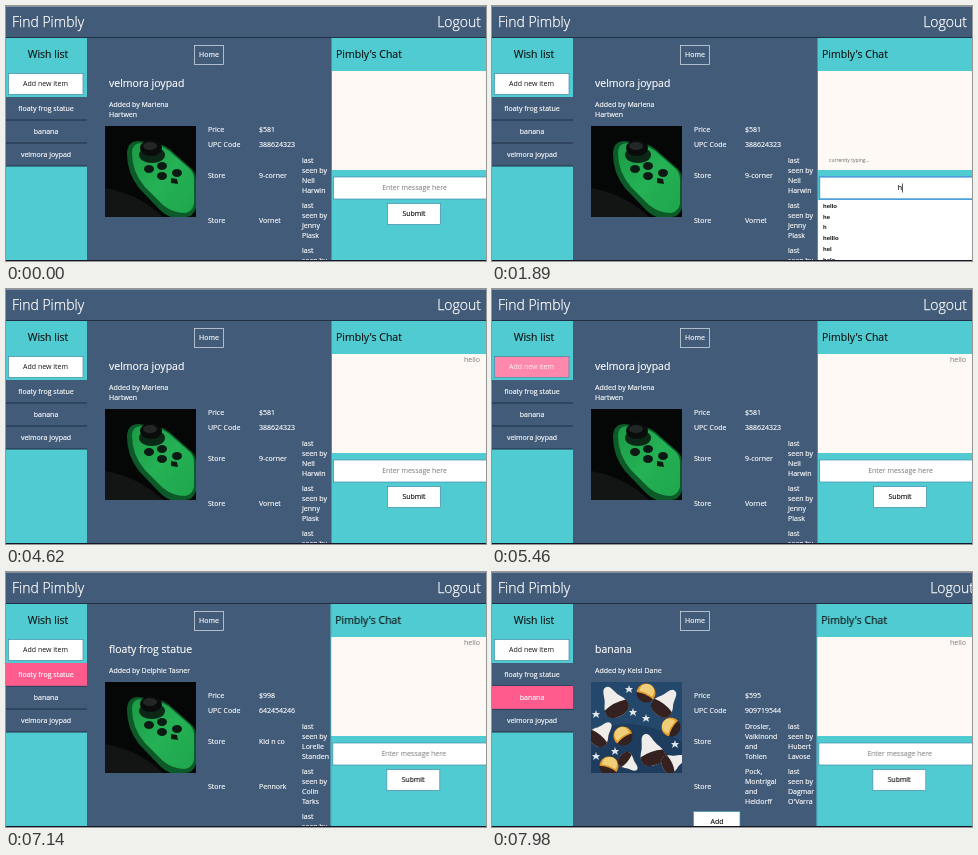
Recreate the animation shown at these times as an HTML page. Size 480 by 255 pixels, loop 8000 ms.

```html
<!DOCTYPE html>
<html lang="en">
<head>
<meta charset="utf-8">
<title>Wish list</title>
<style>
html, body { margin: 0; width: 100%; height: 100%; overflow: hidden; background: #425b78; }
svg { display: block; width: 100%; height: 100%; }
text { font: 7px "Open Sans", sans-serif; fill: #fff; stroke: #fff; stroke-width: .15; white-space: pre; }
.big { font-size: 14px; font-weight: 300; stroke-width: .25; }
.h2 { font-size: 10.5px; }
.dark { fill: #111; stroke: #111; }
.mid { text-anchor: middle; }
.hint { fill: #777; stroke: none; }
.small { font-size: 5px; fill: #666; stroke: none; }
.list text { font: bold 6px "Liberation Sans", Arial, sans-serif; fill: #111; stroke: none; }
.btn { fill: #fff; stroke: #3f8ca8; stroke-width: .7; }
.sea { fill: #50cbd2; }
.line { stroke: #1f2f46; stroke-width: 1; }
.caret { fill: #111; }

/* things that switch on and off */
.sw { animation: 8s step-end infinite; }
.page1 { animation-name: page1; }
.page2 { animation-name: page2; }
.page3 { animation-name: page3; }
.idle { animation-name: idle; }
.typing { animation-name: typing; }
.focus { animation-name: focus; }
.sent { animation-name: sent; }
.k1 { animation-name: k1; }
.k2 { animation-name: k2; }
.k3 { animation-name: k3; }
.k4 { animation-name: k4; }
.k5 { animation-name: k5; }
.chat { animation-name: chat; }
.logout { animation-name: logout; }
@keyframes page1 { 0% { opacity: 1 } 80.5%, 100% { opacity: 0 } }
@keyframes page2 { 0% { opacity: 0 } 80.5% { opacity: 1 } 96.25%, 100% { opacity: 0 } }
@keyframes page3 { 0% { opacity: 0 } 96.25%, 100% { opacity: 1 } }
@keyframes idle { 0% { opacity: 1 } 22.75% { opacity: 0 } 52.5%, 100% { opacity: 1 } }
@keyframes typing { 0% { opacity: 0 } 22.75% { opacity: 1 } 52.5%, 100% { opacity: 0 } }
@keyframes focus { 0% { opacity: 0 } 15.75% { opacity: 1 } 52.5%, 100% { opacity: 0 } }
@keyframes sent { 0% { opacity: 0 } 52.5%, 100% { opacity: 1 } }
@keyframes k1 { 0% { opacity: 0 } 22.75% { opacity: 1 } 27.125%, 100% { opacity: 0 } }
@keyframes k2 { 0% { opacity: 0 } 27.125% { opacity: 1 } 30.625%, 100% { opacity: 0 } }
@keyframes k3 { 0% { opacity: 0 } 30.625% { opacity: 1 } 33.25%, 100% { opacity: 0 } }
@keyframes k4 { 0% { opacity: 0 } 33.25% { opacity: 1 } 35%, 100% { opacity: 0 } }
@keyframes k5 { 0% { opacity: 0 } 35% { opacity: 1 } 52.5%, 100% { opacity: 0 } }
@keyframes chat { 0% { transform: none } 80.5%, 100% { transform: translateX(-.8px) } }
@keyframes logout { 0% { transform: none } 96.25%, 100% { transform: translateX(7px) } }

/* hover fades */
.add { animation: add 8s linear infinite; }
.addText { stroke: none; animation: addText 8s linear infinite; }
.first, .second { fill: #ff5c8d; animation: first 8s linear infinite; }
.second { animation-name: second; }
@keyframes add { 0%, 65.6% { fill: #fff } 69.25%, 71.75% { fill: #ff5c8d } 75.25%, 100% { fill: #fff } }
@keyframes addText { 0%, 65.6% { fill: #111 } 68.4%, 71.75% { fill: #fff } 75.25%, 100% { fill: #111 } }
@keyframes first { 0%, 71.75% { opacity: 0 } 75.25%, 91% { opacity: 1 } 94.5%, 100% { opacity: 0 } }
@keyframes second { 0%, 91% { opacity: 0 } 94.5%, 100% { opacity: 1 } }
</style>
</head>
<body>
<svg viewBox="0 0 480 255" preserveAspectRatio="none">
  <defs>
    <linearGradient id="green" x1="0" y1="0" x2="1" y2="1">
      <stop offset="0" stop-color="#1c9a45"/>
      <stop offset=".5" stop-color="#25b155"/>
      <stop offset="1" stop-color="#1fa64c"/>
    </linearGradient>
    <clipPath id="crop"><path d="M0 0h91v91H0z"/></clipPath>
    <g id="pad" clip-path="url(#crop)">
      <path d="M0 0h91v91H0z" fill="#050606"/>
      <path d="M0 62Q34 68 58 91H0z" fill="#131414"/>
      <path d="M22 28Q22 15 34 15L58 19Q64 22 70 28L87 43Q91 47 91 54V82Q88 91 80 91H66Q60 89 54 83L34 62Q22 47 22 28z" fill="#0d5a29"/>
      <path d="M27 27Q27 17 36 17L58 21Q64 24 70 30L85 43Q89 47 89 54V78Q87 86 80 87Q68 87 58 79L40 61Q27 46 27 27z" fill="url(#green)"/>
      <ellipse cx="47" cy="29" rx="13" ry="8" fill="#0b2716"/>
      <ellipse cx="46" cy="22" rx="11" ry="8" fill="#0a0c0b"/>
      <ellipse cx="45" cy="20" rx="7" ry="4" fill="#222725"/>
      <g fill="#0b1a12">
        <ellipse cx="44" cy="43" rx="5" ry="4"/>
        <ellipse cx="57" cy="40" rx="5" ry="4"/>
        <ellipse cx="57" cy="50" rx="5" ry="4"/>
        <ellipse cx="72" cy="47" rx="5" ry="4"/>
        <path d="M66 52l6 1 1 5-7-1z"/>
      </g>
    </g>
    <g id="pear">
      <path d="M0-13C5-13 4-5 8 0C14 10 7 14 0 14S-14 10-8 0C-4-5-5-13 0-13z" fill="#efedea"/>
      <path d="M-10 4Q0 1 10 4C12 11 7 14 0 14S-12 11-10 4z" fill="#35211f"/>
    </g>
    <g id="slice">
      <circle r="9.5" fill="#35211f"/>
      <path d="M-9 3A9.5 9.5 0 1 1 9 3Q0 0-9 3z" fill="#dc9a2e"/>
      <path d="M-7 1A7.5 7.5 0 1 1 7 1Q0-1-7 1z" fill="#f0cf7a"/>
    </g>
    <path id="star" d="M0-4L1-1 4-1 2 1 3 4 0 2-3 4-2 1-4-1-1-1z" fill="#dfe5ea"/>
    <g id="fruit" clip-path="url(#crop)">
      <path d="M0 0h91v91H0z" fill="#24486c"/>
      <path d="M0 50Q45 30 91 60V91H0z" fill="#1d3c5e"/>
      <use href="#slice" transform="translate(55 11) rotate(25)"/>
      <use href="#slice" transform="translate(32 54) rotate(-35)"/>
      <use href="#slice" transform="translate(80 45) rotate(-60)"/>
      <use href="#slice" transform="translate(18 84) rotate(20)"/>
      <use href="#pear" transform="translate(22 19) rotate(-28) scale(1.2)"/>
      <use href="#pear" transform="translate(75 20) rotate(38) scale(1.1)"/>
      <use href="#pear" transform="translate(11 51) rotate(40)"/>
      <use href="#pear" transform="translate(59 67) rotate(-20) scale(1.2)"/>
      <use href="#pear" transform="translate(38 81) rotate(130) scale(.8)"/>
      <use href="#pear" transform="translate(83 80) rotate(65) scale(.9)"/>
      <use href="#star" x="42" y="30"/>
      <use href="#star" x="55" y="36"/>
      <use href="#star" x="38" y="7"/>
      <use href="#star" x="84" y="62"/>
      <use href="#star" x="24" y="69"/>
      <use href="#star" x="5" y="74"/>
      <use href="#star" x="5" y="32"/>
    </g>
  </defs>

  <rect width="480" height="255" fill="#425b78"/>

  <!-- wish list -->
  <rect class="sea" y="32" width="81" height="223"/>
  <text class="h2 dark mid" x="42" y="52.2">Wish list</text>
  <rect class="btn add" x="2.5" y="67.5" width="74.5" height="21"/>
  <text class="mid addText" x="39.5" y="80.3">Add new item</text>
  <rect y="91" width="81" height="69" fill="#425b78"/>
  <path class="line" d="M0 114H81M0 137H81M0 160H81"/>
  <rect class="first" y="91" width="81" height="22.8"/>
  <rect class="second" y="114" width="81" height="22.8"/>
  <text class="mid" x="40" y="104.8">floaty frog statue</text>
  <text class="mid" x="40" y="127.8">banana</text>
  <text class="mid" x="40" y="150.8">velmora joypad</text>

  <!-- item -->
  <rect x="188.5" y="39.5" width="29" height="19" fill="none" stroke="#d5dde5" stroke-width=".75"/>
  <text class="mid" x="203" y="51.4">Home</text>
  <text x="202" y="125.7">Price</text>
  <text x="202" y="140.8">UPC Code</text>
  <text x="202" y="171.6">Store</text>
  <text x="202" y="216.6">Store</text>

  <g class="sw page1">
    <text class="h2" x="103" y="80.7">velmora joypad</text>
    <text x="103" y="100.8">Added by Marlena<tspan x="103" dy="9.8">Hartwen</tspan></text>
    <use href="#pad" x="99" y="120"/>
    <text x="253" y="125.7">$581</text>
    <text x="253" y="140.8">388624323</text>
    <text x="253" y="171.6">9-corner</text>
    <text x="253" y="216.6">Vornet</text>
    <text x="296" y="156.5">last<tspan x="296" dy="10">seen by</tspan><tspan x="296" dy="10">Nell</tspan><tspan x="296" dy="10">Harwin</tspan></text>
    <text x="296" y="201.5">last<tspan x="296" dy="10">seen by</tspan><tspan x="296" dy="10">Jenny</tspan><tspan x="296" dy="10">Plask</tspan></text>
    <text x="296" y="246.5">last<tspan x="296" dy="10">seen by</tspan></text>
  </g>

  <g class="sw page2">
    <text class="h2" x="103" y="80.7">floaty frog statue</text>
    <text x="103" y="100.8">Added by Delphie Tasner</text>
    <use href="#pad" x="99" y="110"/>
    <text x="253" y="125.7">$998</text>
    <text x="253" y="140.8">642454246</text>
    <text x="253" y="171.6">Kid n co</text>
    <text x="253" y="216.6">Pennork</text>
    <text x="296" y="156.5">last<tspan x="296" dy="10">seen by</tspan><tspan x="296" dy="10">Lorelle</tspan><tspan x="296" dy="10">Standen</tspan></text>
    <text x="296" y="201.5">last<tspan x="296" dy="10">seen by</tspan><tspan x="296" dy="10">Colin</tspan><tspan x="296" dy="10">Tarks</tspan></text>
    <text x="296" y="246.5">last<tspan x="296" dy="10">seen by</tspan></text>
  </g>

  <g class="sw page3">
    <text class="h2" x="103" y="80.7">banana</text>
    <text x="103" y="100.8">Added by Kelsi Dane</text>
    <use href="#fruit" x="99" y="110"/>
    <text x="253" y="125.7">$595</text>
    <text x="253" y="140.8">909719544</text>
    <text x="253" y="156.5">Drosler,<tspan x="253" dy="10">Valkinond</tspan><tspan x="253" dy="10">and</tspan><tspan x="253" dy="10">Tohlen</tspan></text>
    <text x="253" y="201.5">Pock,<tspan x="253" dy="10">Montrigal</tspan><tspan x="253" dy="10">and</tspan><tspan x="253" dy="10">Heldorff</tspan></text>
    <text x="296" y="156.5">last<tspan x="296" dy="10">seen by</tspan><tspan x="296" dy="10">Hubert</tspan><tspan x="296" dy="10">Lavose</tspan></text>
    <text x="296" y="201.5">last<tspan x="296" dy="10">seen by</tspan><tspan x="296" dy="10">Dagmar</tspan><tspan x="296" dy="10">O'Varra</tspan></text>
    <rect class="btn" x="201.5" y="239.5" width="46.5" height="21"/>
    <text class="dark mid" x="225" y="252.3">Add</text>
  </g>

  <!-- chat -->
  <g class="sw chat">
    <rect class="sea" x="325.5" y="32" width="160" height="223"/>
    <text class="h2 dark" x="330" y="52.2">Pimbly's Chat</text>
    <rect x="326" y="65" width="160" height="99" fill="#fff9f6"/>
    <text class="sw typing small" x="337" y="155.5">currently typing...</text>
    <rect class="btn" x="327.5" y="171" width="160" height="22"/>
    <rect class="sw focus" x="327.5" y="170.7" width="160" height="22.5" fill="none" stroke="#4a9de0" stroke-width="1.4"/>
    <text class="sw idle hint mid" x="408.5" y="184.3">Enter message here</text>
    <rect class="btn" x="381.5" y="197.5" width="53" height="21"/>
    <text class="dark mid" x="408" y="210.4">Submit</text>

    <g class="sw k1">
      <text class="dark mid" x="408" y="184.3">h</text>
      <rect class="caret" x="410.2" y="177.5" width=".7" height="9"/>
      <g class="list">
        <rect x="326" y="194" width="160" height="61" fill="#fff"/>
        <text x="331" y="201.8">hello<tspan x="331" dy="10.75">he</tspan><tspan x="331" dy="10.75">h</tspan><tspan x="331" dy="10.75">helllo</tspan><tspan x="331" dy="10.75">hel</tspan><tspan x="331" dy="10.75">helo</tspan></text>
      </g>
    </g>
    <g class="sw k2">
      <text class="dark mid" x="408" y="184.3">he</text>
      <rect class="caret" x="412.2" y="177.5" width=".7" height="9"/>
      <g class="list">
        <rect x="326" y="194" width="160" height="61" fill="#fff"/>
        <text x="331" y="201.8">hello<tspan x="331" dy="10.75">he</tspan><tspan x="331" dy="10.75">helllo</tspan><tspan x="331" dy="10.75">hel</tspan><tspan x="331" dy="10.75">helo</tspan><tspan x="331" dy="10.75">helloooooooo</tspan></text>
      </g>
    </g>
    <g class="sw k3">
      <text class="dark mid" x="408" y="184.3">hel</text>
      <rect class="caret" x="413.1" y="177.5" width=".7" height="9"/>
      <g class="list">
        <rect x="326" y="194" width="160" height="61" fill="#fff"/>
        <text x="331" y="201.8">hello<tspan x="331" dy="10.75">helllo</tspan><tspan x="331" dy="10.75">hel</tspan><tspan x="331" dy="10.75">helo</tspan><tspan x="331" dy="10.75">helloooooooo</tspan><tspan x="331" dy="10.75">helloooooooooo</tspan></text>
      </g>
    </g>
    <g class="sw k4">
      <text class="dark mid" x="408" y="184.3">hell</text>
      <rect class="caret" x="414" y="177.5" width=".7" height="9"/>
      <g class="list">
        <rect x="326" y="194" width="160" height="54" fill="#fff"/>
        <text x="331" y="201.8">hello<tspan x="331" dy="10.75">helllo</tspan><tspan x="331" dy="10.75">helloooooooo</tspan><tspan x="331" dy="10.75">helloooooooooo</tspan><tspan x="331" dy="10.75">hellorrrrrr</tspan></text>
      </g>
    </g>
    <g class="sw k5">
      <text class="dark mid" x="408" y="184.3">hello</text>
      <rect class="caret" x="416.1" y="177.5" width=".7" height="9"/>
      <g class="list">
        <rect x="326" y="194" width="160" height="43.5" fill="#fff"/>
        <text x="331" y="201.8">hello<tspan x="331" dy="10.75">helloooooooo</tspan><tspan x="331" dy="10.75">helloooooooooo</tspan><tspan x="331" dy="10.75">hellorrrrrr</tspan></text>
      </g>
    </g>
  </g>
  <text class="sw sent hint" x="474" y="72.5" text-anchor="end">hello</text>

  <!-- header and window edges -->
  <path class="line" d="M0 31.5H480"/>
  <text class="big" x="6" y="21.2">Find Pimbly</text>
  <text class="sw logout big" x="475" y="21.2" text-anchor="end">Logout</text>
  <path d="M0 .5H480" stroke="#8793a3"/>
  <path d="M0 254.5H480" stroke="#14172a"/>
</svg>
</body>
</html>
```
